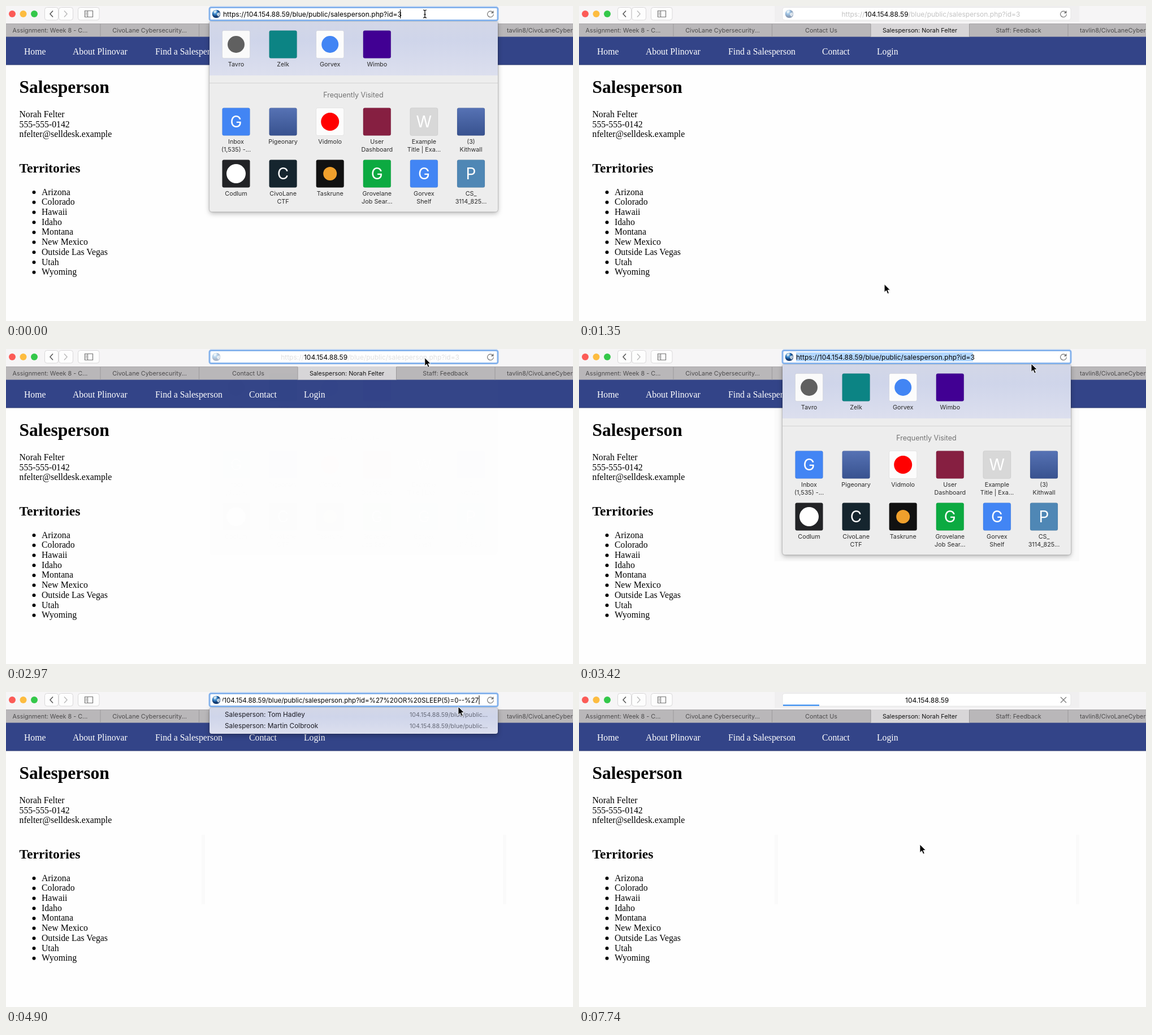
These frames come from a looping animation (1003 px wide and 558 px high, 8000 ms). An HTML page:

```html
<!DOCTYPE html>
<html lang="en">
<head>
<meta charset="utf-8">
<title>Browser address bar</title>
<style>
  html, body { margin: 0; width: 100%; height: 100%; overflow: hidden; background: #fefefe; }
  svg { display: block; width: 100%; height: 100%; }
  text { font-family: Inter, sans-serif; white-space: pre; }
  .page { font: 15.75px "Liberation Serif", serif; }
  .h1 { font-size: 31.5px; font-weight: bold; }
  .h2 { font-size: 23.6px; font-weight: bold; }
  .tab, .label { font-size: 10.8px; }
  .url { font-size: 12.03px; }
  .typed { font-size: 11.55px; }
  .row { font-size: 11.8px; }
  .heading { font-size: 12.5px; }
  .note { font-size: 10.7px; }
  .letter { font-size: 28px; }
  .mid { text-anchor: middle; }
  .end { text-anchor: end; }
  .panel { filter: drop-shadow(0 0 1px #0006) drop-shadow(0 3px 4px #0004); }
  .line { fill: none; stroke: #777; stroke-width: 1.2; }
</style>
</head>
<body>
<svg id="stage" viewBox="0 0 1003 558"></svg>
<script>
const LOOP = 8000;
const HOST = '104.154.88.59';
const PATH = '/blue/public/salesperson.php?id=';

// Markup helpers
const text = (x, y, cls, s, fill = '#000') =>
  `<text x="${x}" y="${y}" class="${cls}" fill="${fill}">${s}</text>`;
const rect = (x, y, w, h, fill, extra = '') =>
  `<rect x="${x}" y="${y}" width="${w}" height="${h}" fill="${fill}" ${extra}/>`;
const circle = (x, y, r, fill) => `<circle cx="${x}" cy="${y}" r="${r}" fill="${fill}"/>`;
const group = (id, body, extra = '') => `<g id="${id}" ${extra}>${body}</g>`;

function toolbar() {
  const button = (x, w) => rect(x, 2.5, w, 22.5, '#fdfdfd', 'rx="4" stroke="#d9d8d9"');
  return rect(0, 0, 1003, 32, '#f6f5f6')
    + group('barHalo', rect(346, 0, 539, 28, '#f0eff0'))
    + circle(11, 14, 6, '#fc5b57') + circle(30.5, 14, 6, '#fdbc40') + circle(50, 14, 6, '#34c84a')
    + button(68.5, 24) + button(93.5, 25) + button(127.5, 37.5)
    + '<path class="line" style="stroke:#555;stroke-width:1.5" d="M83 8.5l-5 5.5 5 5.5"/>'
    + '<path class="line" style="stroke:#bbb;stroke-width:1.5" d="M103 8.5l5 5.5-5 5.5"/>'
    + '<path class="line" d="M139.5 8.5h14v11h-14zM144.5 8.5v11M141 11h2M141 13.5h2M141 16h2"/>';
}

function tabs() {
  const titles = [[78, 'Assignment: Week 8 - C...'], [254, 'CivoLane Cybersecurity...'],
    [428.5, 'Contact Us'], [603, 'Salesperson: Norah Felter'], [777.5, 'Staff: Feedback']];
  return rect(0, 31, 1003, 23.5, '#b9b7b9') + rect(0, 31, 1003, 1, '#a9a7a9')
    + rect(516, 31, 174.5, 23.5, '#d8d6d8')
    + [167, 341.5, 516, 690.5, 865].map(x => rect(x - .5, 32, 1, 22.5, '#9c9a9c')).join('')
    + titles.map(([x, s], i) => text(x, 47, 'tab mid', s, i === 3 ? '#111' : '#4c4b4c')).join('')
    + text(886, 47, 'tab', 'tavlin8/CivoLaneCybersec', '#4c4b4c');
}

function page() {
  const nav = [[32, 'Home'], [118, 'About Plinovar'], [264, 'Find a Salesperson'],
    [430, 'Contact'], [527, 'Login']];
  const places = ['Arizona', 'Colorado', 'Hawaii', 'Idaho', 'Montana', 'New Mexico',
    'Outside Las Vegas', 'Utah', 'Wyoming'];
  const details = ['Norah Felter', '555-555-0142', 'nfelter@selldesk.example'];
  return rect(0, 54, 1003, 50, '#334488') + rect(0, 103.5, 1003, 1, '#2a3970')
    + nav.map(([x, s]) => text(x, 86, 'page', s, '#fff')).join('')
    + text(23.5, 154, 'page h1', 'Salesperson')
    + details.map((s, i) => text(23.5, 197 + 17.7 * i, 'page', s)).join('')
    + text(23.5, 295, 'page h2', 'Territories')
    + places.map((s, i) => circle(49.5, 330 + 17.72 * i, 3, '#000')
      + text(63, 334.5 + 17.72 * i, 'page', s)).join('');
}

// Tile: column, top, colour, label lines, letter, dot colour, dot radius
function tile(col, y, fill, lines, letter = '', dot = '', r = 15) {
  const cx = 407 + 83.1 * col;
  return rect(cx - 24.5, y - .5, 49, 49, fill, 'rx="3" stroke="#0002" stroke-width=".5"')
    + (dot && circle(cx, y + 24, r, dot))
    + (letter && text(cx, y + 34, 'letter mid', letter, '#fff'))
    + lines.map((s, i) => text(cx, y + 63 + 14 * i, 'label mid', s, '#2b2b2b')).join('');
}

function favourites() {
  return '<path class="panel" fill="#ededed" d="M360 28H870V359.5q0 5-5 5H365q-5 0-5-5z"/>'
    + rect(360, 28, 510, 95, 'url(#tint)') + rect(360, 136, 510, 1, '#d2d2d2')
    + text(614.5, 162, 'heading mid', 'Frequently Visited', '#737373')
    + tile(0, 44, '#fafafa', ['Tavro'], '', '#606060')
    + tile(1, 44, '#0c8484', ['Zelk'])
    + tile(2, 44, '#fcfcfc', ['Gorvex'], '', '#4285f4')
    + tile(3, 44, '#410093', ['Wimbo'])
    + tile(0, 181, '#4285f4', ['Inbox', '(1,535) -...'], 'G')
    + tile(1, 181, 'url(#navy)', ['Pigeonary'])
    + tile(2, 181, '#fcfcfc', ['Vidmolo'], '', '#f00', 16)
    + tile(3, 181, '#861f41', ['User', 'Dashboard'])
    + tile(4, 181, '#d8d8d8', ['Example', 'Title | Exa...'], 'W')
    + tile(5, 181, 'url(#navy)', ['(3)', 'Kithwall'])
    + tile(0, 273, '#222326', ['Codlum'], '', '#fff', 17)
    + tile(1, 273, '#15252e', ['CivoLane', 'CTF'], 'C')
    + tile(2, 273, '#111', ['Taskrune'], '', '#f0a02c', 12)
    + tile(3, 273, '#0caa41', ['Grovelane', 'Job Sear...'], 'G')
    + tile(4, 273, '#4285f4', ['Gorvex', 'Shelf'], 'G')
    + tile(5, 273, '#4f87b5', ['CS_', '3114_825...'], 'P');
}

function suggestions() {
  const row = (y, name) => text(387, y, 'row', 'Salesperson: ' + name, '#1c1c24')
    + text(852, y - .5, 'note end', HOST + '/blue/public...', '#666a78');
  return rect(360, 28, 510, 46, 'url(#tint)', 'id="suggestBox" class="panel" rx="4"')
    + row(44, 'Tom Hadley') + row(64, 'Martin Colbrook');
}

function addressBar() {
  return rect(360, 2.5, 510, 22.5, '#fff', 'rx="4" stroke="#e3e2e3" stroke-width=".8"')
    + group('ring', rect(360, 2.5, 510, 23, '#fff', 'rx="3" stroke="#86b3ec" stroke-width="3"'))
    + group('selection', rect(384, 6, 313, 16, '#b3d7ff'))
    + group('globe', circle(372, 14, 7.3, 'url(#ball)')
      + '<path fill="#e4eef2" opacity=".8" d="M367 10q3-4 6-2l-1 3-3 2zM373 13l5-2 1 4-3 4-3-3z"/>')
    + group('plus', '<circle class="line" cx="372" cy="14" r="6"/><path class="line" d="M369 14h6M372 11v6"/>')
    + group('lock', rect(569, 13, 8, 6, '#777', 'rx="1"')
      + '<path class="line" d="M570.8 13v-2a2.2 2.4 0 0 1 4.4 0v2"/>')
    + `<text id="url" y="18.5" class="url"><tspan class="faint">https://</tspan><tspan>${HOST}</tspan><tspan class="faint">${PATH}3</tspan></text>`
    + group('pasted', text(836, 18.5, 'typed end', `https://${HOST}${PATH}%27%20OR%20SLEEP(5)=0--%27`), 'clip-path="url(#field)"')
    + group('loadingHost', text(577, 18.5, 'url', HOST))
    + rect(361, 22.5, 0, 2, '#1f7ff0', 'id="progress"')
    + rect(697, 6, 1, 16, '#000', 'id="caret"')
    + group('reload', '<path class="line" d="M861.3 11.3a5.3 5.3 0 1 0 1 3.2"/><path fill="#777" d="M862.5 8v5h-5z"/>')
    + group('stop', '<path class="line" d="M852 9l10 10M862 9l-10 10"/>');
}

const stage = document.getElementById('stage');
stage.innerHTML = `<defs>
    <linearGradient id="tint" x2="0" y2="1"><stop stop-color="#d3d7e7"/><stop offset=".35" stop-color="#cfd5ea"/><stop offset="1" stop-color="#dcdfee"/></linearGradient>
    <linearGradient id="navy" x2="0" y2="1"><stop stop-color="#5672b4"/><stop offset="1" stop-color="#38528f"/></linearGradient>
    <radialGradient id="ball" cx=".35" cy=".3"><stop stop-color="#9cd0f2"/><stop offset=".6" stop-color="#2d78bd"/><stop offset="1" stop-color="#123a70"/></radialGradient>
    <clipPath id="field"><rect x="383" y="3" width="465" height="22"/></clipPath>
  </defs>`
  + rect(0, 0, 1003, 558, '#fefefe')
  + group('halo', rect(346, 104, 539, 272, '#fafafa'))
  + group('strips', rect(346, 253, 6, 123, '#fafafa') + rect(879, 253, 6, 123, '#fafafa'))
  + page() + toolbar() + tabs()
  + group('favourites', favourites()) + group('suggestions', suggestions())
  + addressBar()
  + group('beam', '<path fill="none" stroke="#000" stroke-width="1.2" d="M-3-7q3 0 3 2q0-2 3-2M0-5V5M-3 7q3 0 3-2q0 2 3 2M-2 1h4"/>')
  + group('arrow', '<path stroke="#fff" stroke-width=".9" d="M0 0V14.5L3.4 11.4 5.8 17 8.3 16 5.9 10.5H10.4Z"/>');

const el = Object.fromEntries([...stage.querySelectorAll('[id]')].map(e => [e.id, e]));
const faintParts = stage.querySelectorAll('.faint');

// The screen only refreshes in short bursts: start, end, number of pictures
const bursts = [[900, 1800, 7], [2090, 2680, 5], [2970, 3420, 4], [3860, 4300, 4],
  [4750, 5050, 3], [5500, 6390, 7], [7440, 7740, 3]];
function sampled(t) {
  const burst = bursts.findLast(b => t >= b[0]);
  if (!burst) return 0;
  const [start, end, count] = burst;
  const step = (end - start) / (count - 1);
  return Math.min(end, start + Math.floor((t - start) / step + .01) * step);
}

// Linear track through [time, value...] keys
function track(keys, t) {
  const next = keys.findIndex(k => k[0] > t);
  if (next === 0) return keys[0].slice(1);
  if (next < 0) return keys.at(-1).slice(1);
  const a = keys[next - 1], b = keys[next], p = (t - a[0]) / (b[0] - a[0]);
  return a.slice(1).map((v, i) => v + (b[i + 1] - v) * p);
}

const pointer = [[750, 741, 14], [900, 705, 110], [1050, 610, 330], [1200, 548, 480],
  [1350, 540, 493], [1500, 575, 390], [1650, 690, 120], [1800, 733, 11], [1940, 733, 11],
  [2680, 721, 12], [2820, 721, 12], [3420, 800, 26], [5350, 800, 26], [6390, 581, 88],
  [7290, 581, 88], [7740, 603, 270]];
const expansion = [[1200, 1], [1350, .49], [1500, .1], [1650, 0], [2820, 0], [2970, .35], [3120, .8], [3270, 1]];
const panelFade = [[1050, 1], [1200, .5], [1350, 0], [2970, 0], [3120, .6], [3270, 1]];
const suggestHeight = [[4600, 210], [4900, 46]];
const loading = [[5500, 0], [6390, 64]];

const show = (name, amount) => el[name].setAttribute('opacity', +amount);

function draw(time) {
  const t = sampled(time) + .5;
  const [x, y] = track(pointer, t);
  const [open] = track(expansion, t);
  const pasted = t >= 3860 && t < 5650, loads = t >= 5650;

  for (const name of ['arrow', 'beam']) el[name].setAttribute('transform', `translate(${x} ${y})`);
  show('beam', t < 900);
  show('arrow', t >= 900);

  el.url.setAttribute('x', 384 + 157.5 * (1 - open));
  faintParts.forEach(part => part.setAttribute('fill-opacity', open ** 2));
  show('url', t < 3860);
  show('globe', loads ? 0 : open);
  show('lock', t >= 1500 && t < 2970);
  show('plus', t >= 2090 && t < 2970);
  show('ring', t < 1200 || t >= 2970 && !loads);
  show('barHalo', t >= 1200 && t < 2970 || loads);
  show('selection', t >= 3120 && t < 3860);
  show('pasted', pasted);
  show('loadingHost', loads);
  show('reload', !loads);
  show('stop', loads);
  el.progress.setAttribute('width', track(loading, t)[0]);
  show('caret', time < 300 || t >= 4750 && !loads);
  el.caret.setAttribute('x', t < 900 ? 697 : 836.5);

  show('favourites', t < 4010 ? track(panelFade, t)[0] : 0);
  show('suggestions', t >= 4010 && !loads);
  el.suggestBox.setAttribute('height', track(suggestHeight, t)[0]);
  show('halo', t >= 3270 && t < 4010);
  show('strips', t >= 4010);
}

function frame() {
  draw(performance.now() % LOOP);
  requestAnimationFrame(frame);
}
frame();
</script>
</body>
</html>
```
